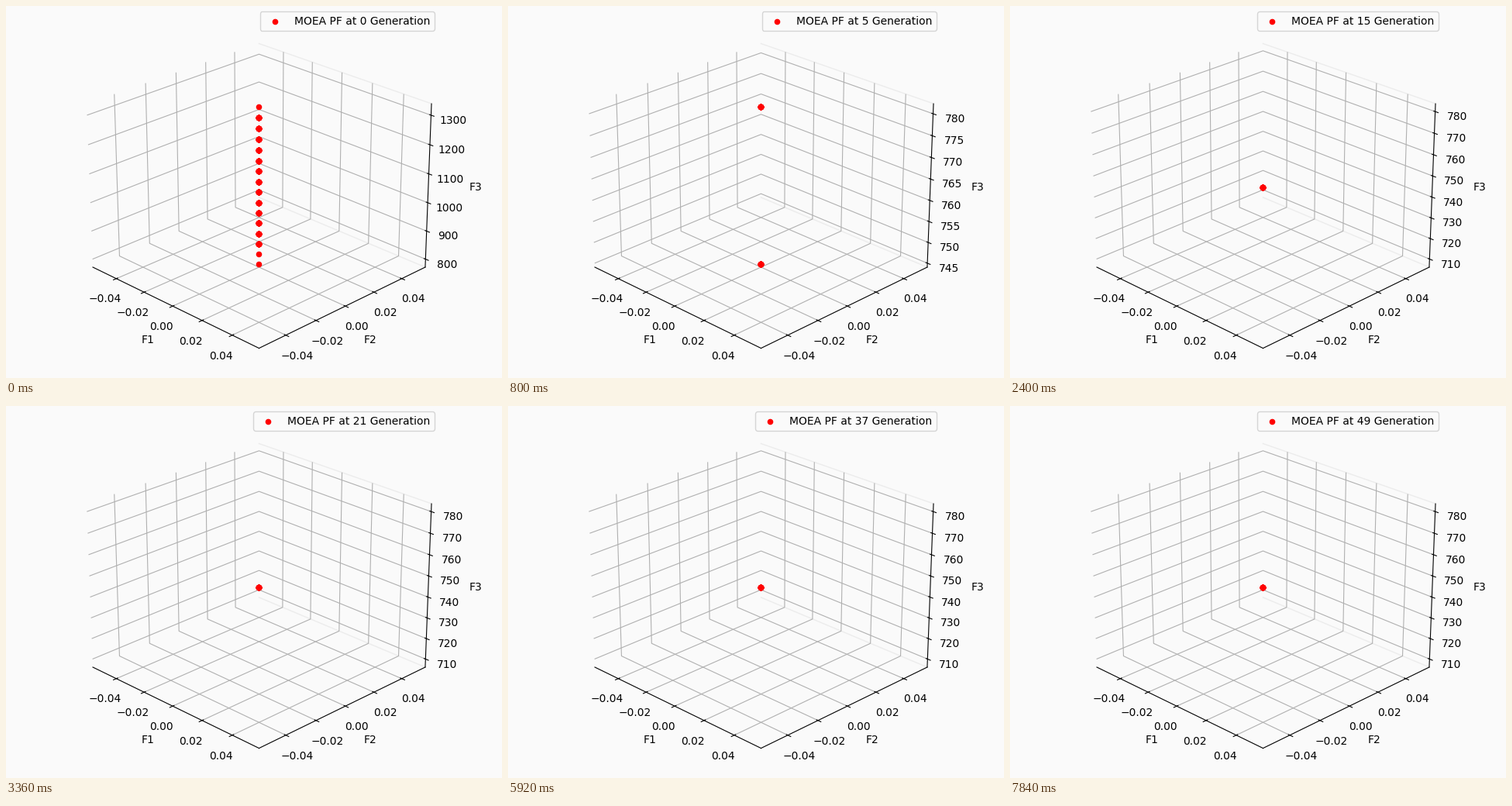
Recreate the animation shown at these times as a matplotlib script. Size 640 by 480 pixels, loop 8000 ms.

```python
import matplotlib.pyplot as plt
import numpy as np
from matplotlib.animation import FuncAnimation
from matplotlib.lines import Line2D

FRAMES, STEP_MS = 50, 160
BG = "#fafafa"
BEST, GAP = 744.8, 36.7      # lowest objective value and spacing of the levels
COPIES = 12                  # population members sharing one level
LEVELS = [16, 9, 5, 4, 3, 2, 2]   # levels per generation, then one

plt.rcParams.update({
    "font.family": "DejaVu Sans",
    "figure.facecolor": BG,
    "axes.facecolor": BG,
})

fig = plt.figure(figsize=(6.4, 4.8), dpi=100)
ax = fig.add_axes([0, 0, 1, 1], projection="3d")
ax.patch.set_visible(False)
ax.view_init(elev=24.5, azim=-45)
for axis in (ax.xaxis, ax.yaxis, ax.zaxis):
    axis.set_pane_color((1, 1, 1, 0))
ax.set_xlabel("F1")
ax.set_ylabel("F2")
ax.set_zlabel("F3")


def faint_edge(x0, y0, x1, y1):
    """Pale edge of the right wall, in pixels from the top left."""
    fig.add_artist(Line2D([x0 / 640, x1 / 640], [1 - y0 / 480, 1 - y1 / 480],
                          color="#ececec", lw=1, zorder=-1))


faint_edge(326.5, 48.5, 549, 126)
faint_edge(326.5, 247, 541, 337)


def front(gen):
    """Objective values of the population and the levels held only once."""
    if gen == 0:
        z = np.linspace(782.5, 1327, LEVELS[0])
        return z, {0, 1, len(z) - 1}
    count = LEVELS[gen] if gen < len(LEVELS) else 1
    z = BEST + GAP * np.arange(count)
    return z, {0} if count > 3 else set()


def padded(lo, hi):
    pad = (hi - lo) / 48
    return lo - pad, hi + pad


points = None


def draw(gen):
    global points
    if points is not None:
        points.remove()
    z, single = front(gen)
    members = np.repeat(z, [1 if i in single else COPIES for i in range(len(z))])
    zero = np.zeros_like(members)
    points = ax.scatter(zero, zero, members, c="red", s=20, depthshade=False,
                        label=f"MOEA PF at {gen} Generation")
    half = 0.05 * BEST if len(z) == 1 else 0
    ax.set_xlim(*padded(-0.055, 0.055))
    ax.set_ylim(*padded(-0.055, 0.055))
    ax.set_zlim(*padded(z[0] - half, z[-1] + half))
    ax.legend(loc="upper right")
    return []


anim = FuncAnimation(fig, draw, frames=FRAMES, interval=STEP_MS,
                     init_func=lambda: draw(0), repeat=True, repeat_delay=0)
plt.show()
```
